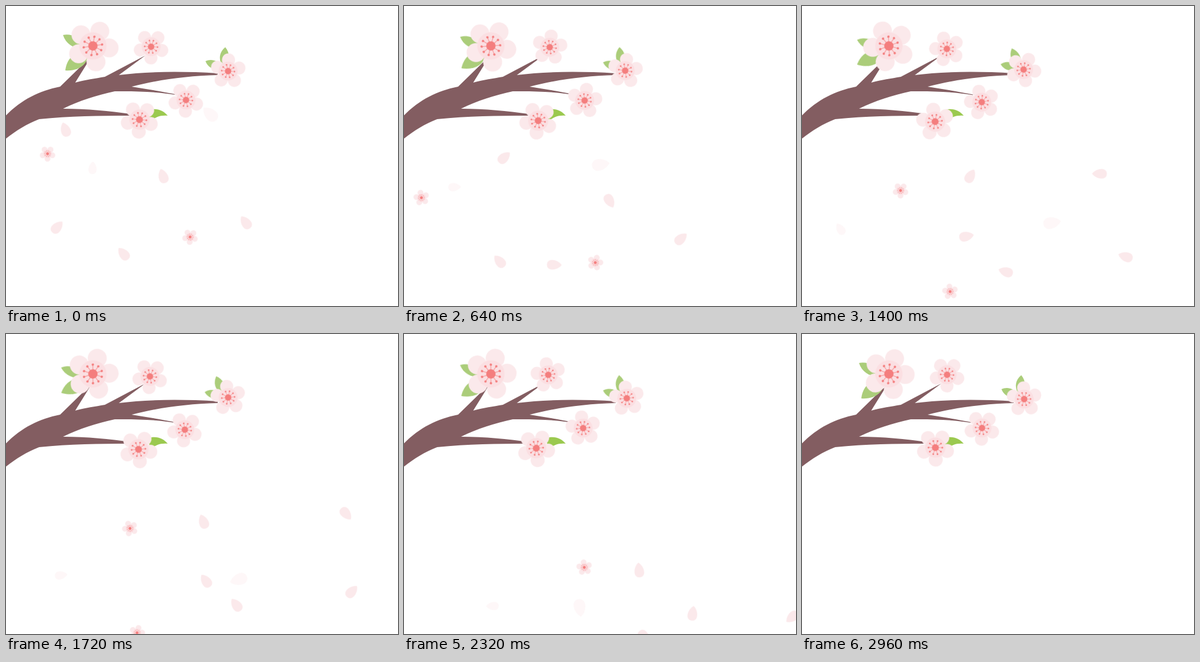
Write an HTML page without scripts that moves like this. It is 674 by 517 pixels and loops after 3000 ms.

```html
<!DOCTYPE html>
<html lang="en">
<head>
<meta charset="utf-8">
<title>Cherry blossom</title>
<style>
html, body { margin: 0; width: 100%; height: 100%; overflow: hidden; background: #fff; }
svg { position: absolute; left: 0; top: 0; overflow: visible; }
.stage { position: absolute; left: 0; top: 0; width: 674px; height: 517px; overflow: hidden; }

.spin { animation: spin 3s linear infinite; }
.ease { animation-timing-function: cubic-bezier(.3333, 0, .6667, 1); }
@keyframes spin { to { transform: rotate(var(--turn, 360deg)); } }

.sway { animation: sway 3s cubic-bezier(.3333, 0, .6667, 1) infinite; }
@keyframes sway { 50% { transform: rotate(var(--sway)); } }

/* each faller runs along six short paths, one after the other */
.fall {
  position: absolute; left: 0; top: 0; width: 0; height: 0; offset-rotate: 0deg;
  --off: path('M-99 -99h1');
  animation: hop 3s step-end infinite, travel 3s linear infinite;
}
.pale { opacity: .38; }
@keyframes hop {
  0% { offset-path: var(--a); }
  21.301% { offset-path: var(--b); }
  31.901% { offset-path: var(--c); }
  46.601% { offset-path: var(--d, var(--off)); }
  69.301% { offset-path: var(--e, var(--off)); }
  86.601%, 100% { offset-path: var(--f, var(--off)); }
}
@keyframes travel {
  0%, 21.301%, 31.901%, 46.601%, 69.301%, 86.601% { offset-distance: 0%; }
  21.3%, 31.9%, 46.6%, 69.3%, 86.6%, 100% { offset-distance: 100%; }
}

.rock1 { animation: rock1 3s ease-in-out infinite; }
@keyframes rock1 {
  0% { transform: rotate(-20deg); animation-timing-function: linear; }
  21.33% { transform: rotate(48deg); animation-timing-function: ease-out; }
  32% { transform: rotate(73deg); }
  46.67% { transform: rotate(30deg); animation-timing-function: ease-out; }
  69.33% { transform: rotate(-48deg); }
  86.67% { transform: rotate(48deg); }
  100% { transform: rotate(70deg); }
}
.rock2 { animation: rock2 3s ease-in-out infinite; }
@keyframes rock2 {
  0% { transform: rotate(-40deg); }
  21.33% { transform: rotate(92deg); animation-timing-function: ease-in; }
  32% { transform: rotate(35deg); animation-timing-function: ease-out; }
  46.67% { transform: rotate(-72deg); }
  69.33% { transform: rotate(5deg); }
  86.67%, 100% { transform: rotate(13deg); }
}
</style>
</head>
<body>
<div class="stage">
<svg width="674" height="517" viewBox="0 0 674 517">
  <defs>
    <path id="petal" fill="#fbe9eb" d="M0-13C5-9 8.3-3 8.3 3.500C8.300 9.500 4.500 12.500 0 12.500S-8.300 9.500-8.300 3.500C-8.300-3-5-9 0-13Z"/>
    <circle id="lobe" cy="-28" r="16.300"/>
    <g id="stamen">
      <path d="M0 0V-16" stroke="#f58e8e" stroke-width="1"/>
      <circle cy="-16" r="2"/>
    </g>
    <g id="pair">
      <use href="#stamen" transform="rotate(20)"/>
      <use href="#stamen" transform="rotate(56)"/>
    </g>
    <g id="bloom">
      <g fill="#fbe9eb">
        <use href="#lobe"/>
        <use href="#lobe" transform="rotate(72)"/>
        <use href="#lobe" transform="rotate(144)"/>
        <use href="#lobe" transform="rotate(216)"/>
        <use href="#lobe" transform="rotate(288)"/>
      </g>
      <circle r="23.500" fill="#fbdfe2"/>
      <g fill="#f47e7e">
        <use href="#pair"/>
        <use href="#pair" transform="rotate(72)"/>
        <use href="#pair" transform="rotate(144)"/>
        <use href="#pair" transform="rotate(216)"/>
        <use href="#pair" transform="rotate(288)"/>
        <circle r="8"/>
      </g>
    </g>
  </defs>

  <path fill="#835d61" d="M0 188.500C26 162 57 146 93 139L138 95L145 90L119 132C137 127 153 125 170 122L240 85L194 119C240 113 300 112 364 116V119C310 120.500 262 127 216 139C242 143 270 148 294 152.500V153.500C258 147.500 222 146.500 187 147C155 154 126 163 98 177C140 177 178 181 214 186V189C160 189 110 189.500 57 195C36 203 17 215 0 228.500Z"/>

  <g fill="#abcd7a">
    <path class="sway" style="--sway:-11deg;transform-origin:140px 72px" d="M98 50C112 47 128 54 140 72C120 76 104 68 98 50Z"/>
    <path class="sway" style="--sway:14deg;transform-origin:140px 76px" d="M102 111C104 92 116 79 140 76C145 97 128 113 102 111Z"/>
    <path class="sway" style="--sway:-28deg;transform-origin:373px 105px" d="M377 71C366 80 365 93 373 105C386 96 386 82 377 71Z"/>
    <path class="sway" style="--sway:-10deg;transform-origin:373px 106px" d="M343 95C352 91 363 92 373 106C360 112 348 108 343 95Z"/>
    <path fill="#9bc94f" d="M278 189C270 179 258 175 244 179.500L248 199C257 191 266 188 278 189Z"/>
  </g>

  <g transform="translate(149.400 68.800)"><g class="spin"><use href="#bloom" transform="rotate(25)"/></g></g>
  <g transform="translate(249 72)"><g class="spin ease"><use href="#bloom" transform="translate(.5 -1.800) rotate(37) scale(.69)"/></g></g>
  <g transform="translate(381.600 110.800)"><g class="spin"><use href="#bloom" transform="translate(.3 1.400) rotate(2) scale(.69)"/></g></g>
  <g transform="translate(309 163.800)"><g class="spin ease"><use href="#bloom" transform="translate(.5 -1.800) rotate(39) scale(.69)"/></g></g>
  <g transform="translate(229 197.500)"><g class="spin"><use href="#bloom" transform="translate(.5 -1.700) rotate(39) scale(.74)"/></g></g>
</svg>

<div class="fall" style="
  --a:path('M102 213C121 226 146 242 172 261');
  --b:path('M172 261C185 271 198 289 214 294');
  --c:path('M214 294C236 301 267 287 289 293');
  --d:path('M289 293C323 302 360 341 385 371');
  --e:path('M385 371C404 394 406 421 423 450');
  --f:path('M423 450C436 473 460 510 480 545')">
  <svg width="1" height="1"><g class="rock1"><use href="#petal"/></g></svg>
</div>
<div class="fall" style="
  --a:path('M71.5 254.5C55 272 36 300 30 330');
  --b:path('M30 330C28 348 55 360 78 354');
  --c:path('M78 354C108 345 140 318 169 318');
  --d:path('M169 318C205 318 222 346 254.5 369');
  --e:path('M254.5 369C290 394 335 412 372 442.5');
  --f:path('M372 442.5C400 465 425 500 440 548')">
  <svg width="1" height="1"><g class="spin ease" style="--turn:4turn"><use href="#bloom" transform="rotate(36) scale(.31)"/></g></svg>
</div>
<div class="fall pale" style="
  --a:path('M149 279C130 288 105 295 87 312');
  --b:path('M87 312C79 320 74 329 71 339');
  --c:path('M71 339C66 354 62 369 66 384');
  --d:path('M66 384C72 408 112 423 133 445');
  --e:path('M133 445C150 462 160 480 168 500');
  --f:path('M168 500C174 514 180 530 185 545')">
  <svg width="1" height="1"><g class="spin ease" style="--turn:2turn"><use href="#petal" transform="rotate(3) scale(.85)"/></g></svg>
</div>
<div class="fall" style="
  --a:path('M270 293C290 325 325 343 353 336');
  --b:path('M353 336C375 331 392 312 415 302');
  --c:path('M415 302C445 289 480 284 511 289');
  --d:path('M511 289C562 297 620 320 657 353');
  --e:path('M657 353C690 380 720 410 760 440')">
  <svg width="1" height="1"><g class="spin ease" style="--turn:4turn"><use href="#petal" transform="rotate(-18)"/></g></svg>
</div>
<div class="fall pale" style="
  --a:path('M351 186C335 212 328 245 338 273');
  --b:path('M338 273C344 289 354 299 368 312.5');
  --c:path('M368 312.5C392 333 432 345 430 373');
  --d:path('M430 373C428 412 383 438 343 457');
  --e:path('M343 457C314 470 282 476 256 490');
  --f:path('M256 490C236 500 215 520 200 545')">
  <svg width="1" height="1"><g class="spin ease" style="--turn:3turn"><use href="#petal" transform="rotate(-47) scale(1.2)"/></g></svg>
</div>
<div class="fall" style="
  --a:path('M88 381C100 410 132 438 164 440');
  --b:path('M164 440C182 441 200 440 216 432');
  --c:path('M216 432C239 421 258 397 282 397');
  --d:path('M282 397C328 397 366 445 391 486');
  --e:path('M391 486C408 514 425 540 440 560')">
  <svg width="1" height="1"><g class="spin ease" style="--turn:-2turn"><use href="#petal" transform="rotate(43)"/></g></svg>
</div>
<div class="fall" style="
  --a:path('M202 427C219 436 238 444 258 446');
  --b:path('M258 446C268 447 279 447 289 448');
  --c:path('M289 448C309 450 330 454 350 458');
  --d:path('M350 458C382 464 414 471 447 476');
  --e:path('M447 476C482 481 520 482 552 492');
  --f:path('M552 492C575 500 596 522 606 548')">
  <svg width="1" height="1"><g class="rock2"><use href="#petal"/></g></svg>
</div>
<div class="fall" style="
  --a:path('M316.5 398C325 411 334 426 329 442');
  --b:path('M329 442C325 455 314 464 303 471.5');
  --c:path('M303 471.5C288 480 270 484 255 492');
  --d:path('M255 492C232 504 213 527 200 548')">
  <svg width="1" height="1"><g class="spin" style="--turn:-5turn"><use href="#bloom" transform="rotate(41) scale(.31)"/></g></svg>
</div>
<div class="fall" style="
  --a:path('M412 373C434 380 457 388 476 401');
  --b:path('M476 401C486 408 492 421 503 426');
  --c:path('M503 426C519 433 538 428 556 432');
  --d:path('M556 432C585 438 612 450 634 465');
  --e:path('M634 465C656 480 682 497 705 515')">
  <svg width="1" height="1"><g class="spin ease" style="--turn:2turn"><use href="#petal" transform="rotate(-36)"/></g></svg>
</div>
</div>
</body>
</html>
```
